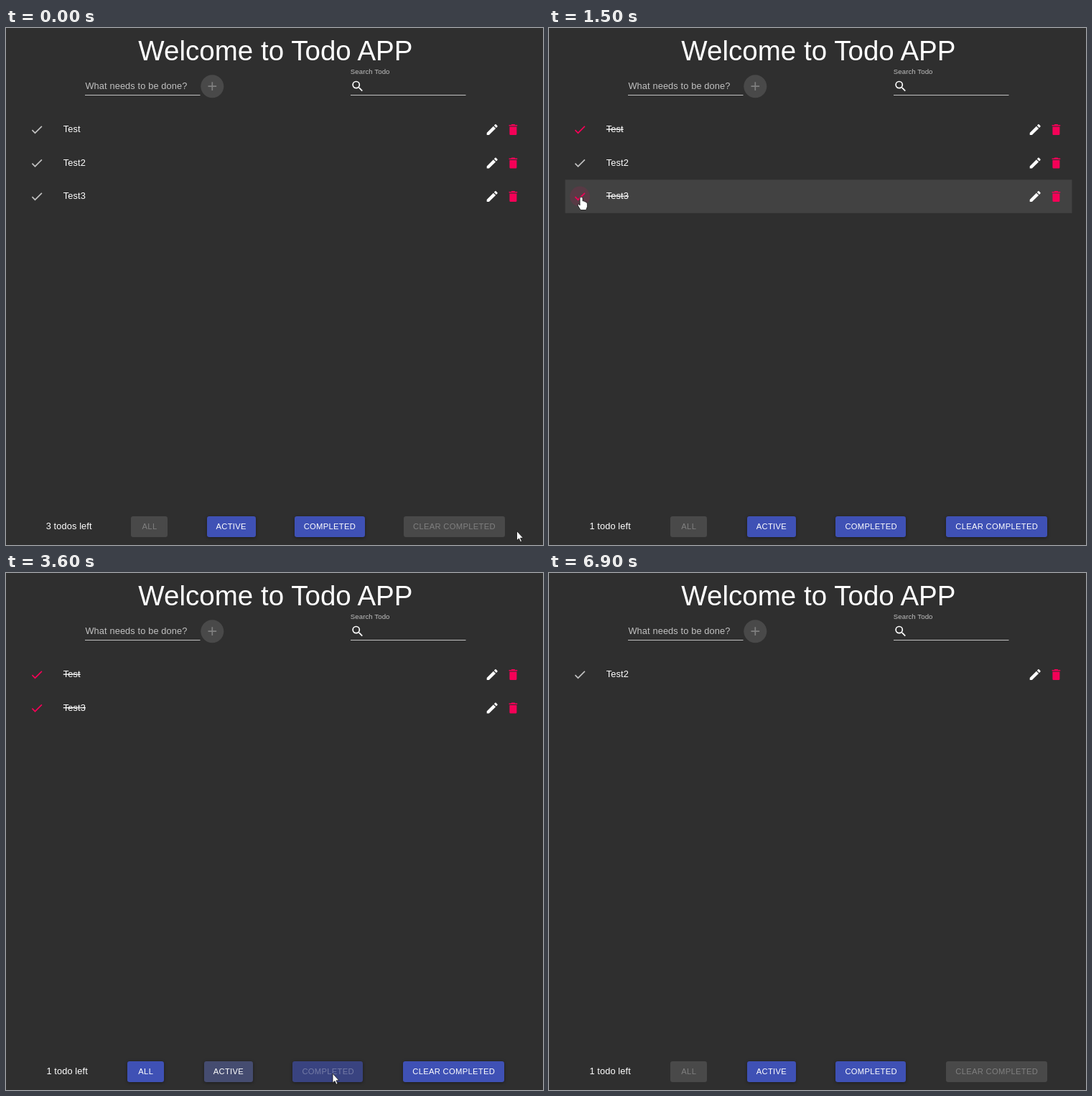
An HTML page that plays this animation: 748 px wide and 720 px high, repeating every 7200 ms.

```html
<!DOCTYPE html>
<html lang="en">
<head>
<meta charset="utf-8">
<title>Todo list</title>
<style>
  html, body { margin: 0; width: 100%; height: 100%; overflow: hidden; background: #2f2f2f; }
  svg { display: block; width: 748px; height: 720px; }
  text { font: 12.8px "Liberation Sans", Arial, sans-serif; fill: #fff; letter-spacing: .12px; white-space: pre; }
  .title { font-size: 38.5px; letter-spacing: .03px; text-anchor: middle; }
  .soft { fill: #c1c1c1; }
  .label { font-size: 9.6px; letter-spacing: .09px; }
  .button { font-size: 11.2px; letter-spacing: .32px; text-anchor: middle; }
  .raised { filter: drop-shadow(0 1px 2px rgba(0, 0, 0, .4)); }
</style>
</head>
<body>
<svg id="stage" viewBox="0 0 748 720"></svg>
<script>
const LOOP = 7200, STEP = 100;
const GREY = [73, 73, 73], BLUE = [63, 81, 181], DARK_BLUE = [48, 63, 159];
const PINK = '#f50057', SOFT = '#c1c1c1';

const ICONS = {
  add: 'M19 13h-6v6h-2v-6H5v-2h6V5h2v6h6v2z',
  done: 'M9 16.2L4.8 12l-1.4 1.4L9 19 21 7l-1.4-1.4L9 16.2z',
  edit: 'M3 17.25V21h3.75L17.81 9.94l-3.75-3.75L3 17.25zM20.71 7.04c.39-.39.39-1.02 0-1.41l-2.34-2.34c-.39-.39-1.02-.39-1.41 0l-1.83 1.83 3.75 3.75 1.83-1.83z',
  bin: 'M6 19c0 1.1.9 2 2 2h8c1.1 0 2-.9 2-2V7H6v12zM19 4h-3.5l-1-1h-5l-1 1H5v2h14V4z',
  search: 'M15.5 14h-.79l-.28-.27A6.47 6.47 0 0 0 16 9.5 6.5 6.5 0 1 0 9.5 16c1.61 0 3.09-.59 4.23-1.57l.27.28v.79l5 4.99L20.49 19l-4.99-5zm-6 0a4.5 4.5 0 1 1 0-9 4.5 4.5 0 0 1 0 9z'
};

const stage = document.getElementById('stage');

function set(node, attrs) {
  for (const key in attrs) node.setAttribute(key, attrs[key]);
  return node;
}
function add(tag, attrs, parent = stage) {
  return parent.appendChild(set(document.createElementNS('http://www.w3.org/2000/svg', tag), attrs));
}
function label(content, x, y, cls = '', parent = stage) {
  const node = add('text', { x, y, class: cls }, parent);
  node.textContent = content;
  return node;
}
function icon(name, x, y, fill, parent = stage) {
  const transform = `translate(${x} ${y}) scale(.8333) translate(-12 -12)`;
  return add('path', { d: ICONS[name], transform, fill }, parent);
}
function show(node, visible) {
  node.style.display = visible ? '' : 'none';
}
function mix(from, to, k) {
  return from.map((c, i) => Math.round(c + (to[i] - c) * k));
}

// What each click does to the list
const toggle = id => (state, at) => ({
  ...state, todos: state.todos.map(todo => todo.id === id ? { ...todo, doneAt: at } : todo)
});
const filterBy = filter => state => ({ ...state, filter });
const clearDone = state => ({ ...state, todos: state.todos.filter(todo => !isDone(todo)) });
const isDone = todo => todo.doneAt < Infinity;

// The pointer rests at each stop and clicks midway
const REST = 400;
const STOPS = [
  { at: -REST, x: 711.5, y: 700.5 },
  { at: 400, x: 45, y: 145, action: toggle(0) },
  { at: 1150, x: 45, y: 235, action: toggle(2) },
  { at: 1840, x: 12, y: 690 },
  { at: 2500, x: 332, y: 698, action: filterBy('ACTIVE') },
  { at: 3350, x: 455, y: 697, action: filterBy('COMPLETED') },
  { at: 4180, x: 633.5, y: 686.5, action: clearDone },
  { at: 5300, x: 191.5, y: 691.5, action: filterBy('ALL') },
  { at: 6900, x: 725, y: -30 }
];

const NAMES = ['Test', 'Test2', 'Test3'];
const history = [{
  since: -Infinity, filter: 'ALL', todos: NAMES.map((name, id) => ({ id, doneAt: Infinity }))
}];
for (const { at, action } of STOPS) {
  if (!action) continue;
  const since = at + REST / 2;
  history.push({ ...action(history[history.length - 1], since), since });
}

function pastStates(t) {
  return history.filter(state => state.since <= t);
}
function shownTodos({ todos, filter }) {
  return todos.filter(todo => filter === 'ALL' || isDone(todo) === (filter === 'COMPLETED'));
}
function isEnabled(name, { todos, filter }) {
  return name === 'CLEAR COMPLETED' ? todos.some(isDone) : name !== filter;
}

function pointAt(t) {
  const next = STOPS.findIndex(stop => stop.at > t);
  if (next === 0) return STOPS[0];
  if (next < 0) return STOPS[STOPS.length - 1];
  const a = STOPS[next - 1], b = STOPS[next], leave = a.at + REST;
  const p = Math.max(0, (t - leave) / (b.at - leave));
  const k = p * p * (3 - 2 * p);
  return { x: a.x + (b.x - a.x) * k, y: a.y + (b.y - a.y) * k };
}

// Header
label('Welcome to Todo APP', 375.4, 45, 'title');
label('What needs to be done?', 110.4, 85, 'soft');
label('Search Todo', 479.8, 64, 'soft label');
for (const x of [110, 480]) add('rect', { x, y: 93, width: 160.5, height: 1, fill: SOFT });
add('circle', { cx: 287.3, cy: 81.2, r: 16, fill: '#494949' });
icon('add', 287.3, 81.2, '#808080');
icon('search', 489.8, 81.2, '#fff');

// List
const LEFT = 22.5, TOP = 118.3, WIDTH = 706, PITCH = 46.5;
const bands = NAMES.map((name, i) =>
  add('rect', { x: LEFT, y: TOP + PITCH * i, width: WIDTH, height: PITCH, fill: '#fff' }));
const rows = NAMES.map(name => {
  const group = add('g', {});
  const ripple = add('circle', { cx: 43, cy: 141.6, r: 14, fill: PINK }, group);
  const check = icon('done', 43, 141.6, SOFT, group);
  const text = label(name, 79.8, 145.2, '', group);
  icon('edit', 677.2, 141.6, '#fff', group);
  icon('bin', 706.4, 141.6, PINK, group);
  return { group, ripple, check, text };
});

function rowUnder({ x, y }, state) {
  const row = Math.floor((y - TOP) / PITCH);
  const inside = x > LEFT && x < LEFT + WIDTH && row >= 0 && row < shownTodos(state).length;
  return inside ? row : -1;
}

function drawRows(t, state) {
  const todos = shownTodos(state);
  rows.forEach((row, id) => {
    const place = todos.findIndex(todo => todo.id === id);
    show(row.group, place >= 0);
    if (place < 0) return;
    const age = t - todos[place].doneAt, done = age >= 0;
    set(row.group, { transform: `translate(0 ${PITCH * place})` });
    set(row.check, { fill: done ? PINK : SOFT });
    row.text.style.textDecoration = done ? 'line-through' : 'none';
    set(row.ripple, { opacity: done ? Math.max(0, .16 * (1 - age / 600)) : 0 });
  });
  // A band glows by how much of the last moments the pointer spent on it
  const recent = [0, 1, 2].map(i => rowUnder(pointAt(t - i * STEP), state));
  bands.forEach((band, i) => set(band, { opacity: .03 * recent.filter(row => row === i).length }));
}

// Footer: the count and the buttons share the free space evenly
const FOOTER = { left: 28.6, width: 693 };
const count = label('', 0, 698);
const buttons = [['ALL', 51.2], ['ACTIVE', 68], ['COMPLETED', 98.2], ['CLEAR COMPLETED', 140.6]]
  .map(([name, width]) => {
    const group = add('g', {});
    const box = add('rect', { y: 680, width: Math.round(width), height: 29, rx: 3.2 }, group);
    return { name, width, box, text: label(name, 0, 698, 'button', group) };
  });
const buttonsWidth = buttons.reduce((sum, b) => sum + b.width, 0);

function drawFooter(t, states) {
  const state = states[states.length - 1];
  const left = state.todos.filter(todo => !isDone(todo)).length;
  const countWidth = left === 1 ? 57 : 64.5;
  const gap = (FOOTER.width - buttonsWidth - countWidth) / 5;
  let x = FOOTER.left + gap / 2;
  count.textContent = `${left} todo${left === 1 ? '' : 's'} left`;
  set(count, { x });
  x += countWidth + gap;
  for (const b of buttons) {
    const on = isEnabled(b.name, state);
    const before = states.filter(s => isEnabled(b.name, s) !== on).pop();
    const changed = before ? history[history.indexOf(before) + 1].since : -Infinity;
    const p = Math.min(1, (t - changed) / 250), k = 1 - (1 - p) ** 2;
    const color = on ? mix(GREY, BLUE, k) : mix(DARK_BLUE, GREY, k);
    b.x = x;
    b.on = on;
    set(b.box, { x: Math.round(x), fill: `rgb(${color})`, class: on || k < .5 ? 'raised' : '' });
    set(b.text, { x: x + b.width / 2 + .16, 'fill-opacity': on ? 1 : .3 });
    x += b.width + gap;
  }
}

// Pointer
const outline = { fill: '#fff', stroke: '#111', 'stroke-width': .8, 'stroke-linejoin': 'round' };
const arrow = add('path', { d: 'M0 0V13.2L3 10.5 5 15.2 7 14.3 5 9.8H9Z', ...outline });
const hand = add('path', {
  d: 'M-2 1.5Q0-1 2 1.5V6Q4 5 4.6 7Q6.4 6.2 7 8Q8.8 8 8.4 11V14L6.6 18.5H-1L-4.4 13Q-6 10-3.6 10.2L-2 12Z',
  ...outline
});

function drawPointer(t, state) {
  const point = pointAt(t), { x, y } = point;
  const onCheck = Math.abs(x - 43) < 14 && rowUnder(point, state) >= 0;
  const onButton = buttons.some(b => b.on && x > b.x && x < b.x + b.width && y > 680 && y < 709);
  const transform = `translate(${x} ${y})`;
  show(hand, onCheck || onButton);
  show(arrow, !onCheck && !onButton);
  set(hand, { transform });
  set(arrow, { transform });
}

const start = performance.now();
function frame() {
  const t = Math.floor((performance.now() - start) % LOOP / STEP) * STEP;
  const states = pastStates(t), state = states[states.length - 1];
  drawRows(t, state);
  drawFooter(t, states);
  drawPointer(t, state);
  requestAnimationFrame(frame);
}
frame();
</script>
</body>
</html>
```
